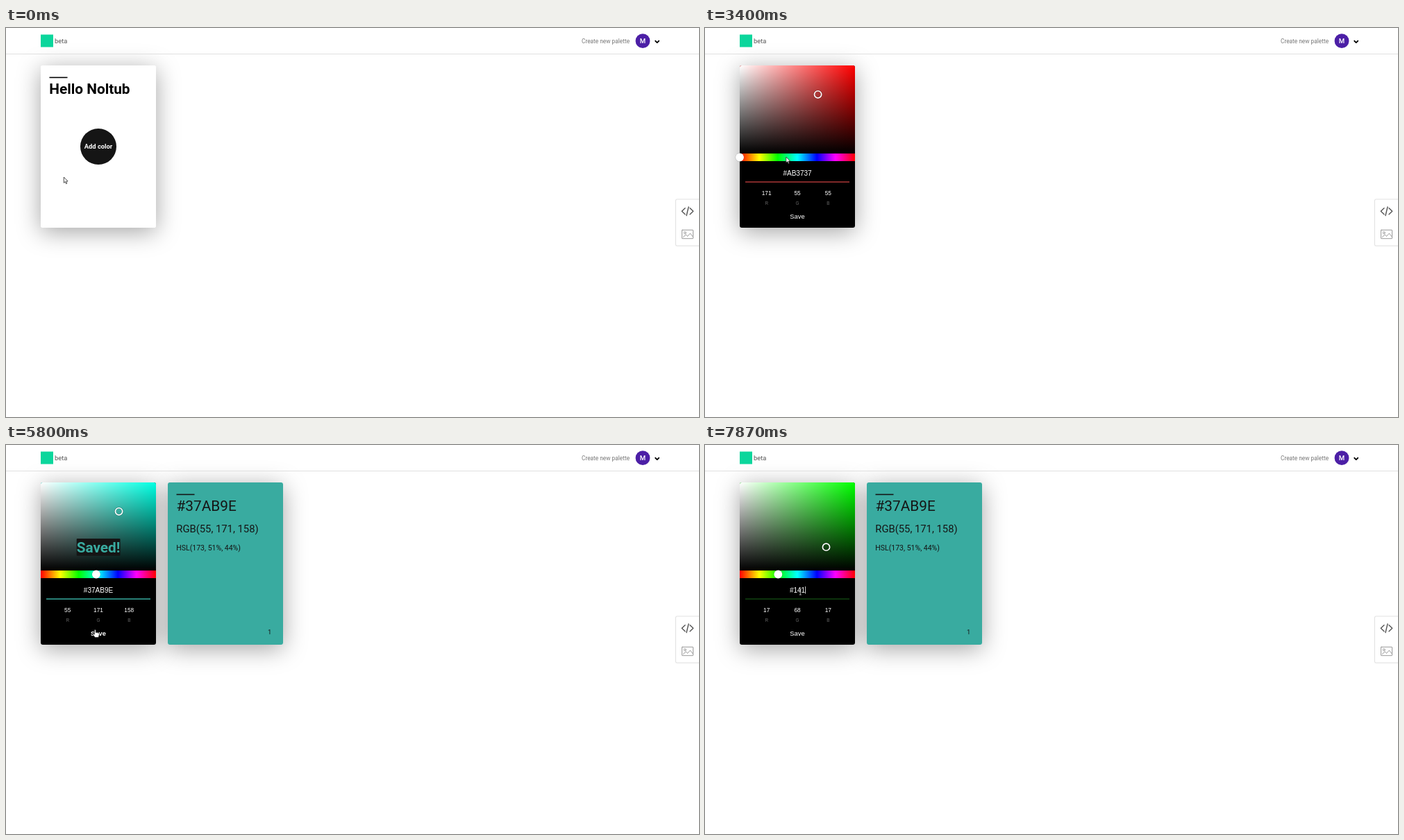
Recreate the animation shown at these times as an HTML page. Size 998 by 561 pixels, loop 8000 ms.

```html
<!DOCTYPE html>
<html lang="en">
<head>
<meta charset="utf-8">
<title>Palette editor</title>
<style>
  html, body { margin: 0; width: 100%; height: 100%; overflow: hidden; background: #fff; }
  #stage { position: absolute; left: 0; top: 0; width: 998px; height: 561px; overflow: hidden; }
  #stage > * { position: absolute; }
  svg { left: 0; top: 0; }
  .card { left: 50px; top: 54px; width: 166px; height: 234px; border-radius: 3px; overflow: hidden; }
  .shadow { box-shadow: 0 6px 34px rgba(0, 0, 0, .36); }
  .second { left: 233px; }
  #blank { background: #fff; }
  #picker { background: #000; }
  #swatch { background: #39aba0; }
  #sat { height: 127px; }
  #hue { height: 11px; background: linear-gradient(90deg, #f00, #ff0 17%, #0f0 33%, #0ff 50%, #00f 67%, #f0f 83%, #f00); }
  text { font-family: Roboto, sans-serif; white-space: pre; }
  .ui { font-family: "Liberation Sans", Arial, sans-serif; fill: #fff; text-anchor: middle; }
  .num { font-size: 8.32px; }
  .label { font-size: 6.4px; fill: #666; }
  .big { font-size: 20.8px; }
  .bold { font-weight: 700; }
  .line { fill: none; stroke-linecap: round; stroke-linejoin: round; }
</style>
</head>
<body>
<div id="stage">
  <div class="card shadow"></div>
  <div class="card shadow second" data-show="saved"></div>
  <div class="card" id="blank" data-show="blank"></div>
  <div class="card" id="picker" data-show="picker"><div id="sat"></div><div id="hue"></div></div>
  <div class="card second" id="swatch" data-show="saved"></div>

  <svg width="998" height="561" viewBox="0 0 998 561">
    <!-- header -->
    <rect y="37" width="998" height="1" fill="#e0e0e0"/>
    <rect x="50" y="9.5" width="18" height="18" fill="#0bd69c"/>
    <text x="70" y="22" font-size="9.36" fill="#555">beta</text>
    <text x="829" y="22.4" font-size="8.32" fill="#777">Create new palette</text>
    <circle cx="917" cy="18.7" r="10.4" fill="#4c1fa6"/>
    <text x="917" y="22.3" font-size="9.6" font-weight="500" fill="#fff" text-anchor="middle">M</text>
    <path class="line" d="M935.2 18.6l2.5 2.5 2.5-2.5" stroke="#000" stroke-width="1.9"/>

    <!-- side tools -->
    <rect x="963.5" y="246.5" width="40" height="68.5" rx="2.5" fill="#000" opacity=".05"/>
    <rect x="964.5" y="247" width="40" height="67" rx="2" fill="#fff" stroke="#ddd" stroke-width=".8"/>
    <path class="line" d="M978 259.8l-4.7 4.5 4.7 4.5M985 259.8l4.7 4.5-4.7 4.5M983 258l-3 12.5" stroke="#555" stroke-width="1.4"/>
    <g class="line" stroke="#999">
      <rect x="973.5" y="291.3" width="16" height="12.4" rx=".5"/>
      <circle cx="977.8" cy="295.4" r="1.5"/>
      <path d="M975.3 301.5l4-3.6 2.2 2.6 3.8-4.4 3.4 4.4"/>
    </g>

    <!-- blank card -->
    <g data-show="blank">
      <rect x="62.5" y="70.6" width="26" height="1.6"/>
      <text class="big bold" x="62.3" y="94.6">Hello Noltub</text>
      <circle cx="133" cy="171" r="26" fill="#151515"/>
      <text class="bold" x="133" y="174" font-size="9.36" fill="#fff" text-anchor="middle">Add color</text>
    </g>

    <!-- picker -->
    <g data-show="picker">
      <g id="ring" class="line">
        <circle r="5.2" stroke="#000" stroke-width="3" opacity=".2"/>
        <circle r="5.1" stroke="#fff" stroke-width="1.7"/>
      </g>
      <g id="knob">
        <circle r="6.4" opacity=".2"/>
        <circle r="5.9" fill="#fff"/>
      </g>
      <rect id="mark" x="119.5" y="203.5" width="35" height="11.5" fill="#3390ff"/>
      <text class="ui" id="hex" x="133" y="212.5" font-size="10"></text>
      <rect id="caret" x="144.2" y="204" width=".8" height="10.5" fill="#fff"/>
      <rect id="rule" x="58" y="221.3" width="150" height="1.5"/>
      <text class="ui num" x="88.7" y="241"></text>
      <text class="ui num" x="133" y="241"></text>
      <text class="ui num" x="177.3" y="241"></text>
      <text class="ui label" x="88.7" y="254.8">R</text>
      <text class="ui label" x="133" y="254.8">G</text>
      <text class="ui label" x="177.3" y="254.8">B</text>
      <text class="ui" id="save" x="133" y="274.8" font-size="9.36">Save</text>
    </g>

    <!-- saved colour -->
    <g data-show="saved" fill="#151515">
      <rect x="245.5" y="70.6" width="26" height="1.6"/>
      <text class="big" x="245.5" y="94.6">#37AB9E</text>
      <text x="245.3" y="126.3" font-size="14.8">RGB(55, 171, 158)</text>
      <text x="245.3" y="152.3" font-size="10.5">HSL(173, 51%, 44%)</text>
      <text x="377" y="272.8" font-size="9.36">1</text>
    </g>
    <g data-show="toast">
      <rect x="101.7" y="135" width="62.8" height="24.8" rx="1" fill="#151515"/>
      <text class="big bold" x="133.1" y="154.8" fill="#39aba0" text-anchor="middle">Saved!</text>
    </g>

    <!-- pointer -->
    <g id="pointer" fill="#fff" stroke="#222" stroke-width=".8" stroke-linejoin="round">
      <path data-shape="arrow" d="M0 0V8.3L1.9 6.6 3.2 9.7 4.5 9.1 3.3 6.2 5.8 6Z"/>
      <path data-shape="hand" d="M-1 1Q0-.6 1 1V4.3L5 5Q6.3 5.4 6.2 6.8L5.6 9.3 4.8 11.5H-.2L-3 7.6Q-3.2 6-2 6.2L-1 7.3Z"/>
      <path data-shape="beam" d="M-1.6-4h3.2M0-4v8M-1.6 4h3.2" fill="none" stroke="#ccc"/>
    </g>
  </svg>
</div>

<script>
const LOOP = 8000, FPS = 15;
const SAT = { x: 50, y: 54, w: 166, h: 127 };

// Ticks of 1/15 s
const OPEN = 32, PICK = 40, DRAG = 55, DROP = 66, SAVE = 87, SELECT = 97, HIDE = 114;
const path = [
  [0, 83, 215], [18, 83, 215], [27, 128, 183], [34, 128, 183],
  [40, 162.6, 96], [43, 162.6, 96], [47, 200, 151], [51, 116.5, 186],
  [55, 116.5, 186], [60, 123.7, 186], [66, 129.9, 186], [71, 129.9, 186],
  [72, 130.4, 195.5], [82, 128, 266], [88, 128, 266], [93, 137, 212], [120, 137, 212]
];
const typed = [[118, '#141'], [114, '#14'], [111, '#1']];

const $ = id => document.getElementById(id);
const all = s => [...document.querySelectorAll(s)];
const parts = all('[data-show]'), shapes = all('[data-shape]'), nums = all('.num');
const place = (el, x, y) => el.setAttribute('transform', `translate(${x} ${y})`);
const show = (el, on) => { el.style.display = on ? '' : 'none'; };

function pointerAt(k) {
  const i = Math.max(1, path.findIndex(p => p[0] >= k));
  const [t0, x0, y0] = path[i - 1], [t1, x1, y1] = path[i];
  const u = (k - t0) / (t1 - t0), e = u * u * (3 - 2 * u);
  return [x0 + (x1 - x0) * e, y0 + (y1 - y0) * e];
}

function shapeAt(k, y) {
  if ((k > PICK && k < 44) || (k >= DRAG && k <= 72)) return 'hand';
  if (k < 73) return 'arrow';
  return y > 262 ? 'hand' : y > 199 && y < 217 ? 'beam' : 'arrow';
}

function hsvAt(k) {
  if (k < PICK) return [0, 0, 1];
  if (k >= 118) return [120, 51 / 68, 68 / 255];
  const x = pointerAt(Math.min(k, DROP))[0];
  return [k < DRAG ? 0 : (x - SAT.x) / SAT.w * 360, 116 / 171, 171 / 255];
}

function toRgb([h, s, v]) {
  return [5, 3, 1].map(n => {
    const q = (n + h / 60) % 6;
    return Math.round(255 * v * (1 - s * Math.max(0, Math.min(q, 4 - q, 1))));
  });
}

function render(time) {
  const k = Math.floor((time % LOOP + 4) * FPS / 1000) % (LOOP * FPS / 1000);
  const visible = { blank: k < OPEN, picker: k >= OPEN, saved: k >= SAVE, toast: k >= SAVE && k < HIDE };
  parts.forEach(el => show(el, visible[el.dataset.show]));

  const hsv = hsvAt(k), [h, s, v] = hsv, rgb = toRgb(hsv);
  const hex = '#' + rgb.map(n => n.toString(16).padStart(2, '0')).join('').toUpperCase();
  const entry = typed.find(e => k >= e[0]);
  $('sat').style.background = `linear-gradient(rgba(0,0,0,0), #000),
    linear-gradient(90deg, #fff, rgba(255,255,255,0)), hsl(${h}, 100%, 50%)`;
  place($('ring'), SAT.x + s * SAT.w, SAT.y + (1 - v) * SAT.h);
  place($('knob'), SAT.x + h / 360 * SAT.w, 186.5);
  $('hex').textContent = entry ? entry[1] : hex;
  $('rule').setAttribute('fill', hex);
  nums.forEach((el, i) => { el.textContent = rgb[i]; });

  show($('mark'), k >= SELECT && !entry);
  show($('caret'), entry);
  if (entry) $('caret').setAttribute('x', 133 + entry[1].length * 2.78);

  const [x, y] = pointerAt(k), shape = shapeAt(k, y);
  place($('pointer'), x + .3, y);
  shapes.forEach(el => show(el, el.dataset.shape === shape));
  $('save').setAttribute('font-weight', k > 72 && shape === 'hand' ? 700 : 400);
}

const start = performance.now();
(function frame() {
  render(performance.now() - start);
  requestAnimationFrame(frame);
})();
</script>
</body>
</html>
```
